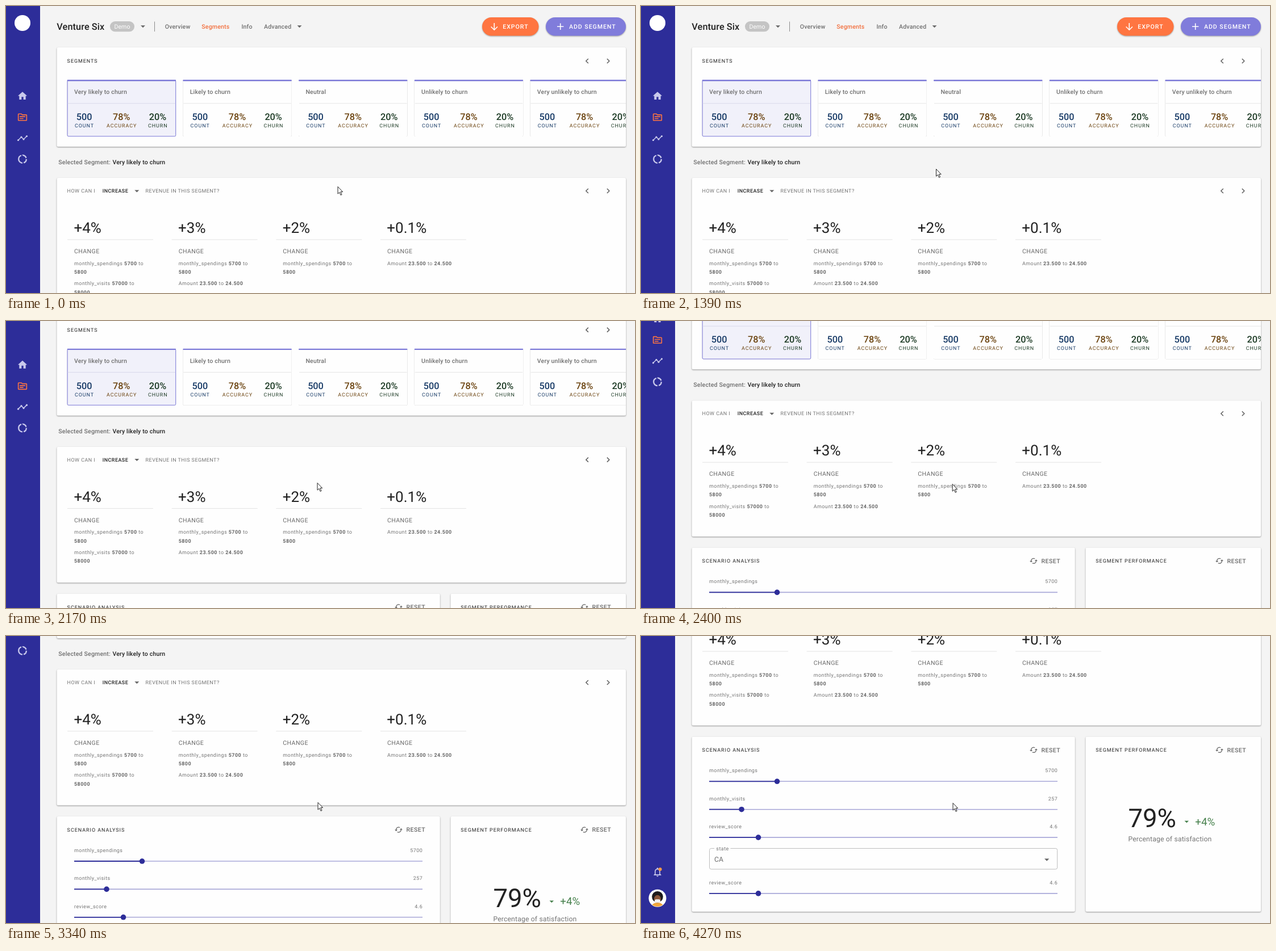
Write an HTML page that moves like this. It is 1107x506 px and loops after 6.92 s.

```html
<!DOCTYPE html>
<html lang="en">
<head>
<meta charset="utf-8">
<title>Segments dashboard</title>
<style>
  html, body { margin: 0; width: 100%; height: 100%; overflow: hidden; background: #f4f4f4; }
  svg { display: block; width: 1107px; height: 506px; }
  text { font-family: Roboto, Arial, sans-serif; text-rendering: geometricPrecision; }
  .title { font-size: 16.27px; font-weight: 500; fill: #222; letter-spacing: .1px; }
  .chip { font-size: 10.58px; fill: #fff; text-anchor: middle; }
  .body { font-size: 10.58px; font-weight: 500; fill: #707070; letter-spacing: .16px; }
  .button { font-size: 10.58px; font-weight: 500; fill: #fff; letter-spacing: .95px; }
  .reset { font-size: 10.58px; font-weight: 500; fill: #6c6c6c; letter-spacing: .45px; }
  .change { font-size: 10.58px; fill: #6a6a6a; letter-spacing: .4px; }
  .over { font-size: 8.95px; fill: #222; letter-spacing: .98px; }
  .cap { font-size: 8.95px; fill: #747474; letter-spacing: .48px; }
  .cap tspan { font-weight: 700; fill: #666; }
  .choice { font-size: 8.95px; font-weight: 500; fill: #222; letter-spacing: .48px; }
  .stat { font-size: 16.27px; font-weight: 500; text-anchor: middle; }
  .statLabel { font-size: 8.95px; letter-spacing: .98px; text-anchor: middle; }
  .gain { font-size: 26px; fill: #222; }
  .score { font-size: 45.56px; fill: #222; }
  .delta { font-size: 18.7px; }
  .field { font-size: 12.2px; fill: #6c6c6c; letter-spacing: .16px; }
  .end { text-anchor: end; }
  .card { fill: #fefefe; filter: drop-shadow(0 1px .8px rgba(0,0,0,.4)); }
  .tile { fill: #fefefe; filter: drop-shadow(0 .9px .7px rgba(0,0,0,.35)); }
  .pill { filter: drop-shadow(0 1px 1.2px rgba(0,0,0,.35)); }
  .line { fill: none; }
</style>
</head>
<body>
<svg viewBox="0 0 1107 506" aria-label="Customer segment dashboard">
  <defs><clipPath id="panel"><rect x="89" y="120" width="1002" height="120"/></clipPath></defs>
  <g id="page"></g>
  <path id="cursor" d="M.5.5V13.2L3.4 10.5 5.5 15.4 7.5 14.5 5.4 9.7H9.2Z" fill="#fff" stroke="#222"/>
</svg>
<script>
const LOOP = 6920;
const NOTCH = 81.36;
const SCROLL_END = 384.8;
const INDIGO = '#2d2d99';
const VIOLET = '#7d7ad8';
const ORANGE = '#ff7541';

const text = (x, y, value, cls, fill) =>
  `<text x="${x}" y="${y}" class="${cls}"${fill ? ` style="fill:${fill}"` : ''}>${value}</text>`;
const rect = (x, y, w, h, attrs) => `<rect x="${x}" y="${y}" width="${w}" height="${h}" ${attrs}/>`;
const path = (d, color, width = 1.5) =>
  `<path d="${d}" class="line" stroke="${color}" stroke-width="${width}"/>`;
const circle = (x, y, r, fill) => `<circle cx="${x}" cy="${y}" r="${r}" fill="${fill}"/>`;
const caret = (x, y, half, fill = '#666') =>
  `<path d="M${x - half} ${y - half / 2}h${2 * half}l${-half} ${half}z" fill="${fill}"/>`;
const icon = (x, y, d, fill, scale = .8136) =>
  `<path transform="translate(${x} ${y}) scale(${scale}) translate(-12 -12)" d="${d}" fill="${fill}"/>`;
const card = (x, y, w, h) => rect(x, y, w, h, 'rx="2.5" class="card"');
const pager = y =>
  path(`M1024.8 ${y - 4}l-4 4 4 4M1057.8 ${y - 4}l4 4-4 4`, '#606060');

function sidebar() {
  const pale = '#c9c9ec';
  const nodes = [[21.5, 236.5], [27, 231], [31, 235], [36.5, 229.5]];
  return rect(0, 0, 60, 900, `fill="${INDIGO}"`) +
    circle(29, 30, 14, '#fff') +
    icon(29, 158.5, 'M10 20v-6h4v6h5v-8h3L12 3 2 12h3v8z', pale) +
    icon(29, 196, 'M20 6h-8l-2-2H4c-1.1 0-2 .9-2 2v12c0 1.1.9 2 2 2h16c1.1 0 2-.9 2-2V8c0-1.1-.9-2-2-2zm0 12H4V6h5.2l2 2H20zm-2-6H6v-2h12zm-4 4H6v-2h8z', ORANGE) +
    path('M' + nodes.join('L'), pale) + nodes.map(([x, y]) => circle(x, y, 1.6, pale)).join('') +
    `<circle cx="29" cy="270" r="6.8" class="line" stroke="${pale}" stroke-width="2.3" pathLength="100" stroke-dasharray="20 5 45 5 20 5"/>` +
    icon(29, 801, 'M12 22c1.1 0 2-.9 2-2h-4c0 1.1.9 2 2 2zm6-6v-5c0-3-1.6-5.6-4.5-6.3V4a1.5 1.5 0 0 0-3 0v.7C7.6 5.4 6 7.9 6 11v5l-2 2v1h16v-1zm-2 1H8v-6c0-2.5 1.5-4.5 4-4.5s4 2 4 4.5z', pale) +
    circle(33.6, 796, 3, '#f59a45') +
    circle(29, 847, 15.5, '#fff') +
    '<path d="M19.5 858.5q9.5-8 19 0a15.5 15.5 0 0 1-19 0z" fill="#f0a63c"/>' +
    circle(29, 844.5, 9.8, '#1d1a1c') +
    '<ellipse cx="29" cy="848.5" rx="6" ry="7" fill="#8a5539"/>' +
    rect(24, 849, 10, 6, 'rx="2.8" fill="#f2f2f2"');
}

function header() {
  return text(89.3, 42, 'Venture Six', 'title') +
    rect(183, 27, 43, 18.3, 'rx="9.1" fill="#c4c4c4"') + text(204.5, 39.9, 'Demo', 'chip') +
    caret(241, 36.2, 4) + path('M261.5 27.5V45', '#8c8c8c', 1) +
    text(279.7, 39.9, 'Overview', 'body') + text(344.3, 39.9, 'Segments', 'body', '#f2703f') +
    text(414.4, 39.9, 'Info', 'body') + text(454, 39.9, 'Advanced', 'body') + caret(516.5, 36.2, 4) +
    rect(838, 20, 99.5, 32.6, `rx="16.3" fill="${ORANGE}" class="pill"`) +
    path('M859.3 30V42M853.6 36.5l5.7 5.7 5.7-5.7', '#fff', 1.6) +
    text(874.3, 39.9, 'EXPORT', 'button') +
    rect(950, 20, 141, 32.6, 'rx="16.3" fill="#807cdb" class="pill"') +
    path('M975.7 30.5V41.9M970 36.2h11.4', '#fff', 1.6) +
    text(991, 39.9, 'ADD SEGMENT', 'button');
}

function segmentTile(name, i) {
  const x = 107.6 + i * 203.7;
  const stats = [
    [30, '500', 'COUNT', '#173a66'],
    [95.7, '78%', 'ACCURACY', '#6b430f'],
    [159.3, '20%', 'CHURN', '#1d3b25'],
  ];
  return rect(x, 130.5, 191.5, 99.5, 'rx="2" class="tile"') +
    (i ? '' : rect(x + .5, 131, 190.6, 98.7, `rx="2" fill="#f1f1fa" stroke="${VIOLET}"`)) +
    rect(x, 130, 191.5, 2.4, `rx="1" fill="${VIOLET}"`) +
    path(`M${x + 1} 171.8h189.5`, i ? '#e6e6e6' : '#d9d9ea', 1) +
    text(x + 12.4, 155, name, 'body') +
    stats.map(([dx, value, label, color]) =>
      text(x + dx, 201, value, 'stat', color) + text(x + dx + .4, 213.9, label, 'statLabel', color)).join('');
}

function segments() {
  const names = ['Very likely to churn', 'Likely to churn', 'Neutral', 'Unlikely to churn', 'Very unlikely to churn'];
  return card(89.5, 73, 1001.5, 175) + text(107.6, 100.4, 'SEGMENTS', 'over') + pager(97) +
    `<g clip-path="url(#panel)">${names.map(segmentTile).join('')}</g>` +
    text(92.3, 279.2, 'Selected Segment:', 'body') +
    text(187.4, 279.2, names[0], 'body', '#222');
}

function suggestions() {
  const bold = value => `<tspan>${value}</tspan>`;
  const spend = [`monthly_spendings ${bold(5700)} to`, bold(5800)];
  const visits = [`monthly_visits ${bold(57000)} to`, bold(58000)];
  const amount = [`Amount ${bold('23.500')} to ${bold('24.500')}`];
  const columns = [
    ['+4%', spend, visits], ['+3%', spend, amount], ['+2%', spend], ['+0.1%', amount],
  ];
  return card(89.5, 303, 1001.5, 239.6) +
    text(107.6, 329.2, 'HOW CAN I', 'cap') +
    text(169.7, 329.2, 'INCREASE', 'choice') + caret(230.3, 326.4, 4) +
    text(245.6, 329.2, 'REVENUE IN THIS SEGMENT?', 'cap') + pager(326) +
    columns.map(([gain, ...changes], i) => {
      const x = 120 + i * 183.65;
      return text(x - .6, 400.2, gain, 'gain') + path(`M${x - 12} 411.9h151`, '#e4e4e4', 1) +
        text(x, 436, 'CHANGE', 'change') +
        changes.map((rows, c) => rows.map((row, r) =>
          text(x, 456.8 + c * 35.5 + r * 15.4, row, 'cap')).join('')).join('');
    }).join('');
}

function resetButton(x) {
  return icon(x, 585.7, 'M19 8l-4 4h3c0 3.3-2.7 6-6 6-1 0-2-.25-2.8-.7l-1.46 1.46C9 19.5 10.4 20 12 20c4.4 0 8-3.6 8-8h3zM6 12c0-3.3 2.7-6 6-6 1 0 2 .25 2.8.7l1.46-1.46C15 4.5 13.6 4 12 4c-4.4 0-8 3.6-8 8H1l4 4 4-4z', '#666', .63) +
    text(x + 13.5, 589.5, 'RESET', 'reset');
}

function slider(name, value, knob, row) {
  const y = 641.1 + row * 49.4;
  return text(120, y - 16, name, 'cap') + text(733.2, y - 16, value, 'cap end') +
    path(`M120 ${y}H733`, '#a9a8d8', 1.6) + path(`M120 ${y}H${knob}`, INDIGO, 1.8) +
    circle(knob, y, 4.8, INDIGO);
}

function scenarioCard() {
  return card(89.5, 562.2, 674.3, 308.6) + text(107.6, 589, 'SCENARIO ANALYSIS', 'over') + resetButton(691) +
    slider('monthly_spendings', '5700', 239.5, 0) +
    slider('monthly_visits', '257', 177, 1) +
    slider('review_score', '4.6', 206.5, 2) +
    rect(120.5, 759.3, 612.2, 36.6, 'rx="3" fill="none" stroke="#bdbdbd"') +
    rect(129, 757, 28.5, 5, 'fill="#fefefe"') + text(132.3, 762.8, 'state', 'cap') +
    text(129, 783.2, 'CA', 'field') + caret(714.2, 779.4, 4.2) +
    slider('review_score', '4.6', 206.5, 4);
}

function performanceCard() {
  const green = '#46804c';
  return card(782.5, 562.2, 308.5, 308.6) + text(800.3, 589, 'SEGMENT PERFORMANCE', 'over') + resetButton(1018) +
    text(857.4, 722, '79%', 'score') + caret(960.3, 712.5, 3.8, green) +
    text(975.3, 718.4, '+4%', 'delta', green) +
    text(857.4, 746.6, 'Percentage of satisfaction', 'field', '#747474');
}

const page = document.getElementById('page');
const cursor = document.getElementById('cursor');
page.innerHTML = sidebar() + header() + segments() + suggestions() + scenarioCard() + performanceCard();

// Pointer strokes: first step, last step, step count, resting x and y.
const strokes = [
  [70, 540, 7, 521, 298], [690, 1070, 5, 503.5, 288], [1300, 1390, 2, 519, 287],
  [1540, 1620, 2, 521.5, 285], [1870, 1930, 2, 547, 285], [2100, 2170, 2, 547.5, 285],
  [2400, 2720, 5, 548, 292], [2890, 2890, 1, 548.5, 293], [3420, 3490, 2, 548.5, 294],
];
const wheelTimes = [2100, 2400, 3340, 3420, 4270];

function pointerAt(time) {
  let x = 583.5, y = 318;
  for (const [start, end, count, toX, toY] of strokes) {
    if (time < start) break;
    const interval = (end - start) / (count - 1) || 1;
    const part = Math.min(count, 1 + Math.floor((time - start) / interval + .001)) / count;
    const eased = part * (1.5 - part / 2);
    x += (toX - x) * eased;
    y += (toY - y) * eased;
  }
  return [x, y];
}

function render(time) {
  const notches = wheelTimes.filter(at => time >= at).length;
  const scroll = Math.min(notches * NOTCH, SCROLL_END);
  page.setAttribute('transform', `translate(0 ${-scroll})`);
  cursor.setAttribute('transform', `translate(${pointerAt(time)})`);
}

const origin = performance.now();
function tick() {
  render((performance.now() - origin) % LOOP);
  requestAnimationFrame(tick);
}
tick();
</script>
</body>
</html>
```
